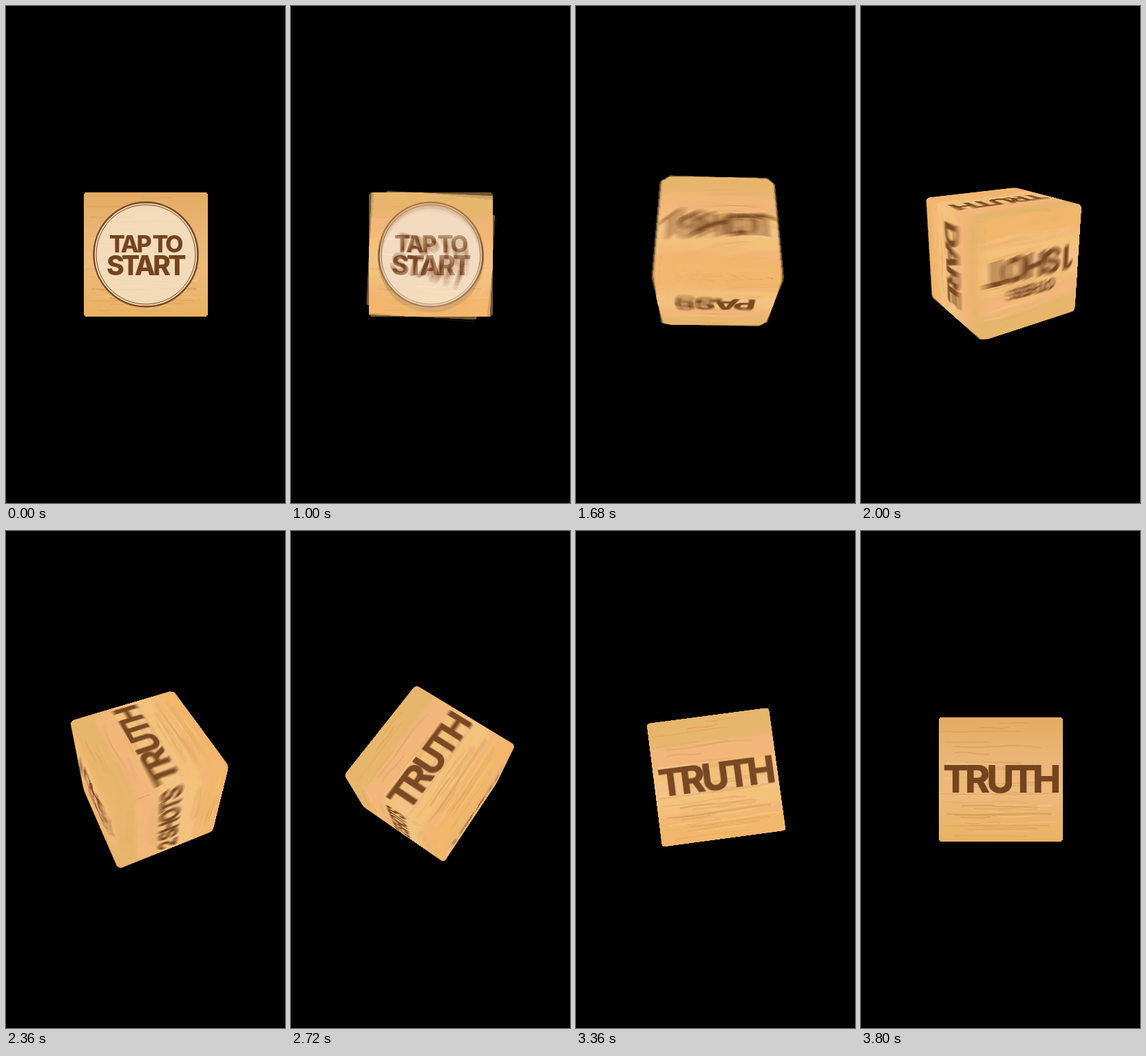
Recreate the animation shown at these times as an HTML page. Size 405 by 720 pixels, loop 7040 ms.

```html
<!DOCTYPE html>
<html lang="en">
<head>
<meta charset="utf-8">
<title>Party die</title>
<style>
  html, body { margin: 0; width: 100%; height: 100%; overflow: hidden; background: #000; }
  #stage { position: relative; width: 405px; height: 720px; overflow: hidden; filter: url(#crisp); }
  .scene { position: absolute; inset: 0; perspective: 600px; mix-blend-mode: plus-lighter; }
  .cube { position: absolute; left: 112.5px; top: 270px; width: 180px; height: 180px; transform-style: preserve-3d; }
  .face { position: absolute; left: 0; top: 0; width: 180px; height: 180px; }
  text { font-family: Inter, "Open Sans", sans-serif; font-weight: 800; letter-spacing: -.095em; text-anchor: middle; fill: #74441f; }
</style>
</head>
<body>
<svg width="0" height="0" style="position:absolute">
  <filter id="crisp" color-interpolation-filters="sRGB">
    <feComponentTransfer><feFuncA type="linear" slope="5" intercept="-2"/></feComponentTransfer>
  </filter>
  <linearGradient id="wood" x2="0" y2="1">
    <stop offset="0" stop-color="#e4ab62"/>
    <stop offset=".3" stop-color="#e9b574"/>
    <stop offset=".6" stop-color="#ecba7c"/>
    <stop offset="1" stop-color="#e9b162"/>
  </linearGradient>
</svg>
<div id="stage"></div>
<script>
const LOOP = 7040, STEP = 40, START = 999, SPIN = 2800, SHUTTER = 28, SAMPLES = 12;
const stage = document.getElementById('stage');

let seed = 7;
const rand = () => (seed = seed * 16807 % 2147483647) / 2147483647;

function grain() {
  let lines = '';
  for (let i = 0; i < 46; i++) {
    const y = 8 + rand() * 164, x = 2 + rand() * 90, w = 25 + rand() * (150 - x);
    const bend = () => (rand() * 6 - 3).toFixed(1);
    const color = rand() < .65 ? '#c98f48' : '#f6cd8c';
    lines += `<path d="M${x} ${y}q${w / 4} ${bend()} ${w / 2} 0t${w / 2} ${bend()}" fill="none"
      stroke="${color}" stroke-width="${.6 + rand() * 1.6}" opacity="${.2 + rand() * .3}"/>`;
  }
  return lines;
}

const word = (text, size, y) => `<text x="89" y="${y}" font-size="${size}">${text}</text>`;

const face = (turn, content) => `<svg class="face" viewBox="0 0 180 180"
  style="transform:${turn} translateZ(90px)">
  <rect width="180" height="180" rx="7" fill="url(#wood)"/>${grain()}${content}</svg>`;

const badge = `<g class="badge">
  <circle cx="90" cy="90" r="75.5" fill="#f6e3c8" fill-opacity=".82" stroke="#74441f" stroke-width="2.4"/>
  <circle cx="90" cy="90" r="72" fill="none" stroke="#74441f" stroke-width="1"/>
  ${word('TAP TO', 34, 87)}${word('START', 39, 120)}</g>`;

const cubeHtml = '<div class="cube">' +
  face('rotateY(0deg)', badge + `<g class="result">${word('TRUTH', 55, 109)}</g>`) +
  face('rotateY(90deg)', word('DARE', 58, 111)) +
  face('rotateY(180deg)', word('PASS', 55, 110)) +
  face('rotateY(-90deg)', word('2 SHOTS', 46, 107)) +
  face('rotateX(90deg)', word('OTHERS', 24, 70) + word('1 SHOT', 54, 119)) +
  face('rotateX(-90deg)', word('1 SHOT', 54, 110)) + '</div>';

// One scene per shutter sample; their sum gives the motion blur.
const scenes = Array.from({ length: SAMPLES }, () => {
  const el = document.createElement('div');
  el.className = 'scene';
  el.innerHTML = cubeHtml;
  stage.append(el);
  return {
    el,
    cube: el.firstChild,
    badge: el.querySelector('.badge'),
    result: el.querySelector('.result')
  };
});

const bezier = (a, b, s) => 3 * (1 - s) ** 2 * s * a + 3 * (1 - s) * s * s * b + s ** 3;

function ease(p) {
  if (p <= 0 || p >= 1) return p <= 0 ? 0 : 1;
  let lo = 0, hi = 1;
  for (let i = 0; i < 30; i++) {
    const mid = (lo + hi) / 2;
    if (bezier(.165, .19, mid) < p) lo = mid; else hi = mid;
  }
  return bezier(.5, 1, lo);
}

function pose(scene, t) {
  const left = 1 - ease((t - START) / SPIN);
  scene.cube.style.transform =
    `translateZ(-90px) rotateX(${360 * left}deg) rotateZ(${-1080 * left}deg)`;
}

function draw(t) {
  const moving = t >= 1000 && t < 3800;
  const started = t >= 1400;
  scenes.forEach((scene, i) => {
    const used = moving || i === 0;
    scene.el.style.display = used ? '' : 'none';
    if (!used) return;
    scene.el.style.opacity = moving ? 1 / SAMPLES : 1;
    scene.badge.style.display = started ? 'none' : '';
    scene.result.style.display = started ? '' : 'none';
    pose(scene, moving ? t + (i / (SAMPLES - 1) - .5) * SHUTTER : t);
  });
}

const origin = performance.now();
let shown = -1;
function tick() {
  const t = Math.floor((performance.now() - origin) % LOOP / STEP) * STEP;
  if (t !== shown) draw(shown = t);
  requestAnimationFrame(tick);
}
tick();
</script>
</body>
</html>
```
